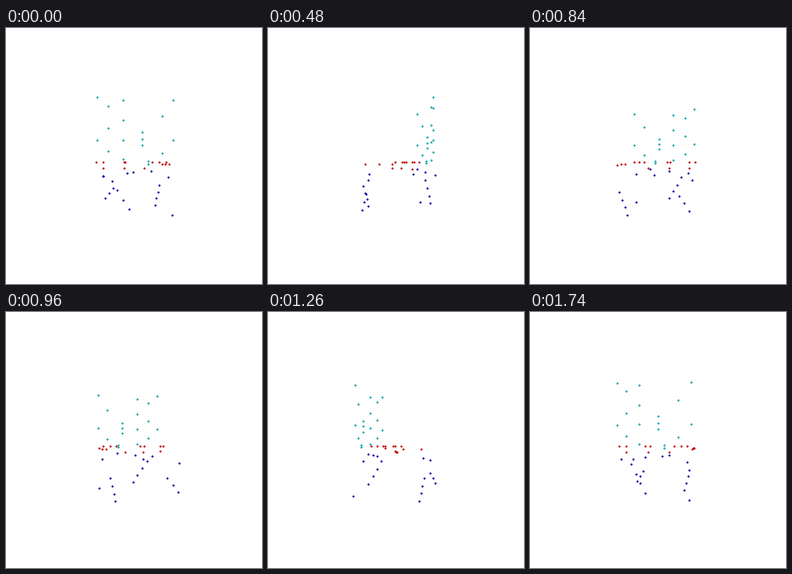
Write a matplotlib script that moves like this. It is 256 by 256 pixels and loops after 1800 ms.

```python
import numpy as np
import matplotlib.pyplot as plt
from matplotlib.animation import FuncAnimation

SIZE, DPI = 256, 72
FRAMES, STEP = 30, 60
CX, HORIZON, DIST = 128.4, 133.8, 240


def strut(a, b, n):
    """n points spread evenly from a to b, each (x, depth, height)."""
    return np.linspace(a, b, n)


def slat(x, top, bottom, n):
    """Upright of the back, which bows outwards in the middle."""
    z = 33.5 - .0047 * x * x
    return strut((x, z, top), (x, z, bottom), n)


def chair():
    back = [
        slat(-33, 57, 19, 2), slat(-23, 49, 9, 3), slat(-10, 53, 2, 4),
        slat(6.7, 25.5, 14.5, 3), slat(11.5, 1, -1.5, 2),
        slat(24, 39.5, 7.6, 2), slat(34.5, 55, 19, 2),
    ]
    seat = [
        strut((31, -32, -3), (35, -1, -2), 3),
        strut((30, 14, 0), (17, 8, 0), 3),
        strut((-9.5, 16, 0), (-9.5, -2, 0), 2),
        strut((-35.5, 16, 0), (-30, 11, 0), 2),
        strut((-30, 11, -6), (10, -4, -6), 3),
    ]
    legs = [
        strut((33, 31, -46), (30.5, 22, -14), 2),
        strut((-5, 33, -41), (-20, 25, -17), 4),
        strut((23, -28, -48), (28, -34, -27), 4),
        strut((-33, -33, -41), (-24, -30, -29), 3),
        strut((-35.5, -28, -15.5), (-2, -27, -11.5), 2),
        strut((-27, 32, -12), (14.5, 24, -8), 3),
    ]
    return [np.vstack(part) for part in (back, seat, legs)]


def project(points, angle):
    x, z, h = points.T
    c, s = np.cos(angle), np.sin(angle)
    scale = DIST / (DIST - (z * c - x * s))
    return np.column_stack([CX + (x * c + z * s) * scale,
                            HORIZON - h * scale])


fig = plt.figure(figsize=(SIZE / DPI, SIZE / DPI), dpi=DPI, facecolor="white")
ax = fig.add_axes([0, 0, 1, 1])
ax.set(xlim=(0, SIZE), ylim=(SIZE, 0))
ax.axis("off")

parts = chair()
colors = ["#00a4a8", "#c40000", "#0000a8"]
dots = [ax.scatter(*project(pts, 0).T, s=4.4, c=color, linewidths=0,
                   antialiased=False)
        for pts, color in zip(parts, colors)]


def update(i):
    for dot, pts in zip(dots, parts):
        dot.set_offsets(project(pts, 2 * np.pi * i / FRAMES))
    return dots


anim = FuncAnimation(fig, update, frames=FRAMES, interval=STEP,
                     repeat=True, repeat_delay=0)
plt.show()
```
